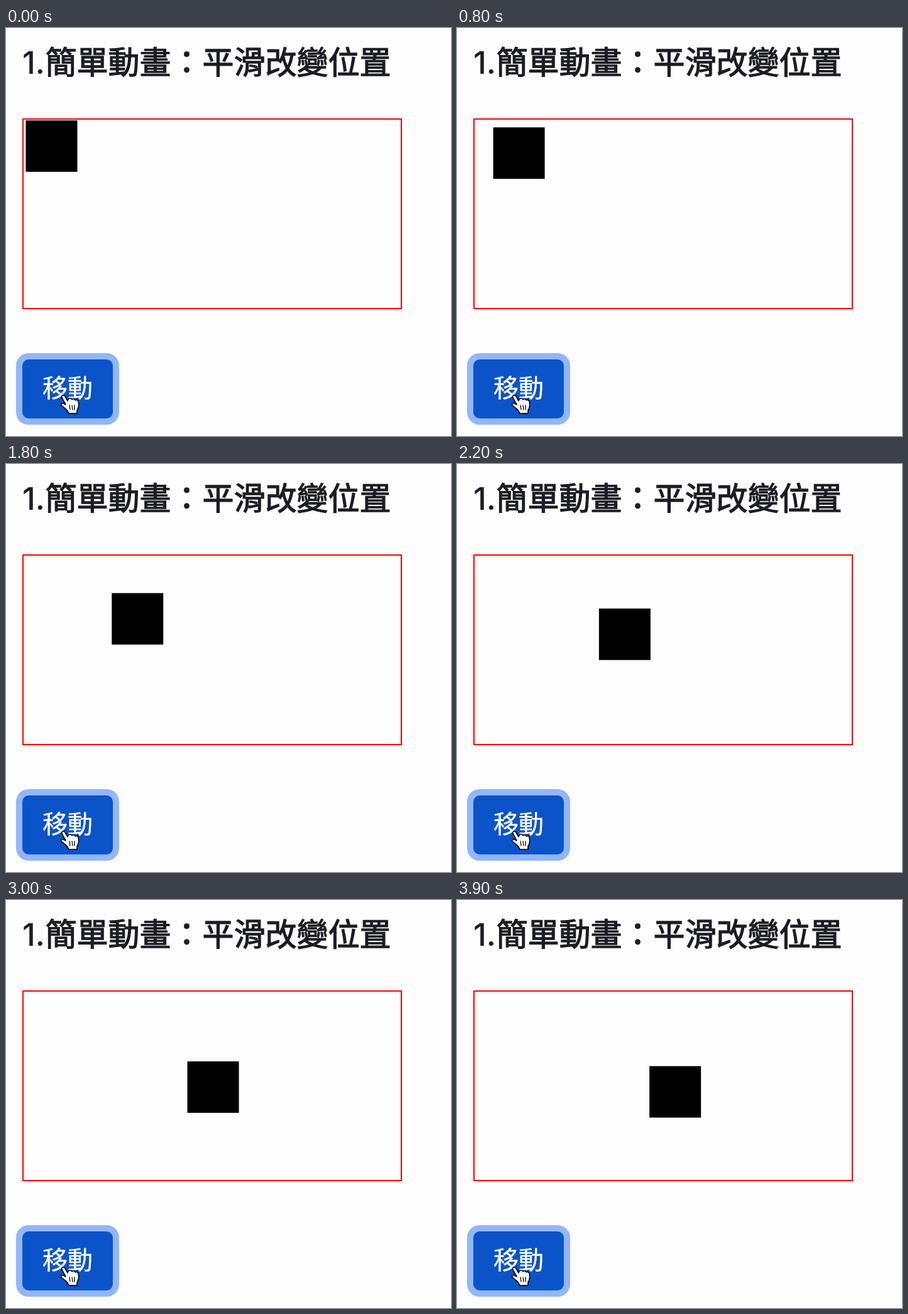
Recreate the animation shown at these times as an HTML page. Size 708 px wide and 650 px high, loop 4 s.

```html
<!DOCTYPE html>
<html lang="zh-Hant">
<head>
<meta charset="utf-8">
<title>平滑改變位置</title>
<style>
  html, body { margin: 0; width: 100%; height: 100%; overflow: hidden; background: #fdfdfd; }
  svg { display: block; }
  text { font-family: "Noto Sans CJK TC", "Noto Sans CJK", sans-serif; }
  .title { font-size: 50px; fill: #1c1d24; stroke: #1c1d24; stroke-width: 1.3px; }
  .number { font: 500 50px Inter, sans-serif; fill: #1c1d24; }
  .label { font-size: 40px; fill: #fff; stroke: #fff; stroke-width: .4px; text-anchor: middle; }
</style>
</head>
<body>
<svg width="708" height="650" viewBox="0 0 708 650">
  <text class="number" x="26" y="73">1.</text>
  <text class="title" x="62.5" y="73">簡單動畫：平滑改變位置</text>

  <rect x="27" y="145" width="602" height="302" fill="none" stroke="#f00" stroke-width="2"/>
  <rect id="box" width="82" height="82"/>

  <rect x="16" y="518" width="164" height="114" rx="20" fill="#92b6fa"/>
  <rect x="26" y="528" width="144" height="94" rx="10" fill="#0a53c9"/>
  <text class="label" x="98" y="588">移動</text>

  <!-- hand pointer -->
  <g stroke="#000" stroke-width="1.6" stroke-linejoin="round" stroke-linecap="round">
    <path fill="#fff" d="M89 589 Q88 585 91 585 Q93 585 94 587 L98 594
      Q99 590 102 590 Q104 590 105 592 Q108 589 110 593 Q114 591 115 595
      Q117 603 113 609 L113 614 L100 614 Q98 609 94 606 L88 601
      Q87 597 91 598 L95 600 Z"/>
    <path fill="none" stroke-width="1.3" d="M101 601 L102 608 M105 601 L106 608 M109 601 L109 608"/>
  </g>
</svg>
<script>
  const LOOP = 4000, STEP = 100, DURATION = 4870, OFFSET = 0.131;
  const box = document.getElementById("box");
  const easeInOutCubic = t => t < 0.5 ? 4 * t ** 3 : 1 - 4 * (1 - t) ** 3;

  function draw(now) {
    const time = Math.floor(now % LOOP / STEP) * STEP;
    const p = easeInOutCubic(OFFSET + time / DURATION);
    box.setAttribute("x", 29 + 277.5 * p);
    box.setAttribute("y", 146.1 + 118.7 * p);
    requestAnimationFrame(draw);
  }
  draw(0);
</script>
</body>
</html>
```
